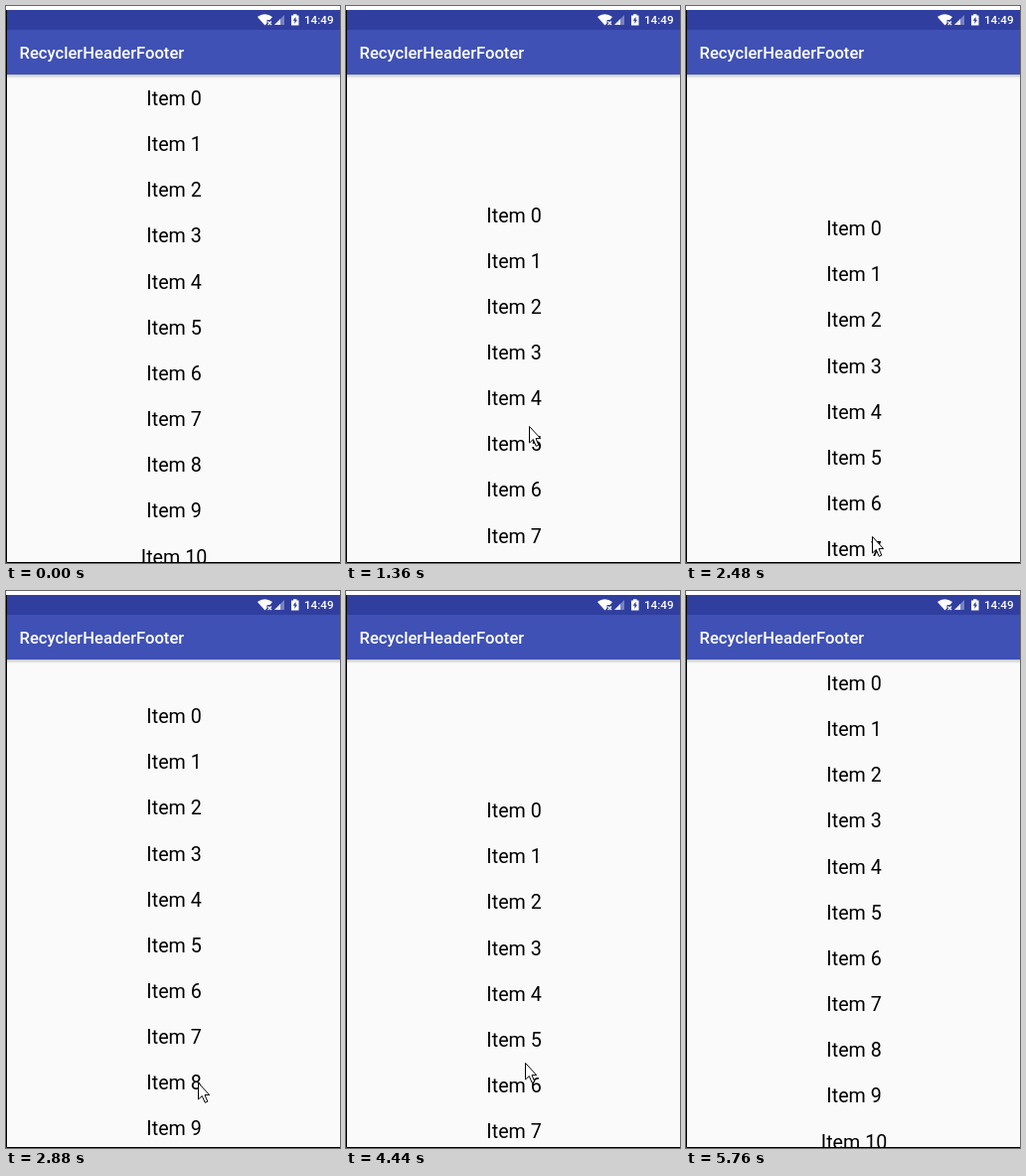
Animation of 336x561 px, one loop 6.16 s. Source, as an HTML page:

```html
<!DOCTYPE html>
<html lang="en">
<head>
<meta charset="utf-8">
<title>Pull-down list</title>
<style>
  html, body { margin: 0; width: 100%; height: 100%; overflow: hidden; background: #fff; }
  svg { display: block; width: 336px; height: 561px; }
  text { font-family: Roboto, sans-serif; }
  .bar { font-weight: 500; fill: #fff; }
  #list { font-size: 19.7px; text-anchor: middle; fill: #000; }
</style>
</head>
<body>
<svg viewBox="0 0 336 561">
  <defs>
    <linearGradient id="shade" x2="0" y2="1">
      <stop offset="0" stop-color="#000" stop-opacity=".22"/>
      <stop offset="1" stop-color="#000" stop-opacity="0"/>
    </linearGradient>
  </defs>
  <rect y="4" width="336" height="557" fill="#fafafa"/>
  <g id="list"></g>

  <rect y="69" width="336" height="4" fill="url(#shade)"/>
  <rect y="23" width="336" height="46" fill="#3f51b5"/>
  <rect y="4" width="336" height="20" fill="#303f9f"/>
  <text class="bar" x="13.6" y="53" font-size="16.6">RecyclerHeaderFooter</text>
  <text class="bar" x="300" y="18" font-size="11.67">14:49</text>

  <g fill="#fff">
    <path d="M253 11Q260.5 5.5 268 11L265.5 14H262.5V17.3L260.500 19.5Z"/>
    <path d="M263.5 15.5L267 19M267 15.5L263.5 19" stroke="#fff" stroke-width="1.1"/>
    <path d="M270 19L280 9V19Z" opacity=".35"/>
    <path d="M270 19L276 13V19Z" opacity=".85"/>
    <path d="M287 9.5H289V8.3H292.5V9.5H294.5V19.5H287Z"/>
    <path d="M291.5 10.8L288.7 14.8H290.4V18L293 13.8H291.5Z" fill="#303f9f"/>
  </g>

  <path d="M.5 4V560.5H336" fill="none" stroke="#000"/>
  <path id="cursor" d="M.5 .5V17L4.3 13.5L7.2 20.3L9.8 19.2L7 12.6H11.7Z"
        fill="#fff" stroke="#000"/>
</svg>
<script>
const LOOP = 6160, STEP = 40;
const LIMIT = 140, REACH = 119, SETTLE = 606;
const list = document.getElementById('list');
const cursor = document.getElementById('cursor');

for (let i = 0; i <= 10; i++) {
  const row = document.createElementNS('http://www.w3.org/2000/svg', 'text');
  row.setAttribute('x', 169.1);
  row.setAttribute('y', 100 + i * 46.15);
  row.textContent = 'Item ' + i;
  list.append(row);
}

// The pointer's main stops; power shapes the speed on the way to each one.
const stops = [
  { t: 0, x: 345, y: 28 },
  { t: 520, x: 181, y: 205, power: 1 },
  { t: 960, x: 181, y: 341, power: 1.3 },
  { t: 1840, x: 186, y: 495, power: 0.8 },
  { t: 2516, x: 187, y: 536, power: 0.8 },
  { t: 2880, x: 193, y: 495, power: 1 },
  { t: 3300, x: 197, y: 181, power: 1 },
  { t: 3360, x: 197, y: 181, power: 1 },
  { t: 3840, x: 196, y: 306, power: 1.3 },
  { t: 4440, x: 180, y: 475, power: 0.8 },
  { t: 5000, x: 186, y: 538, power: 0.8 },
  { t: 5140, x: 186, y: 538, power: 1 },
  { t: 5760, x: 344, y: 215, power: 3 }
];
const drags = [{ press: 520, release: 2516 }, { press: 3360, release: 5140 }];

function pointer(t) {
  const i = stops.findIndex(s => s.t > t);
  if (i < 0) return stops[stops.length - 1];
  const a = stops[i - 1], b = stops[i];
  const k = ((t - a.t) / (b.t - a.t)) ** b.power;
  return { x: a.x + (b.x - a.x) * k, y: a.y + (b.y - a.y) * k };
}

// The list follows the drag with growing resistance, then springs back.
function pull(t, { press, release }) {
  if (t < press) return 0;
  const travel = pointer(Math.min(t, release)).y - pointer(press).y;
  const offset = LIMIT * (1 - Math.exp(-travel / REACH));
  const back = Math.min(1, Math.max(0, (t - release) / SETTLE));
  return offset * (1 - back) ** 1.5;
}

function draw(t) {
  const { x, y } = pointer(t);
  const shift = drags.reduce((sum, drag) => sum + pull(t, drag), 0);
  list.setAttribute('transform', `translate(0 ${shift.toFixed(2)})`);
  cursor.setAttribute('transform', `translate(${Math.round(x)} ${Math.round(y)})`);
}

const begin = performance.now();
function tick() {
  const t = (performance.now() - begin) % LOOP;
  draw(Math.floor(t / STEP) * STEP);
  requestAnimationFrame(tick);
}
tick();
</script>
</body>
</html>
```
